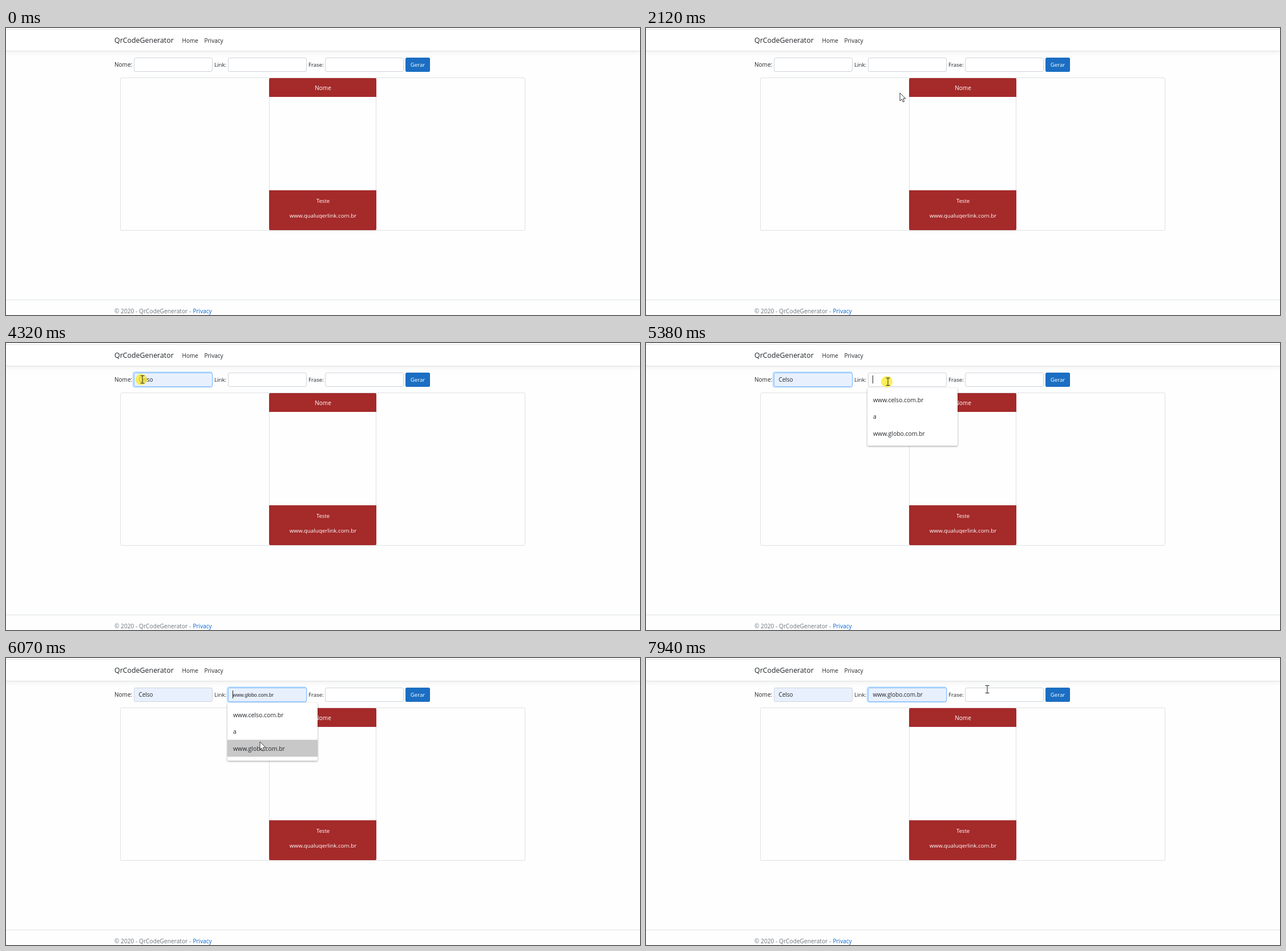
Animation of 1111 by 504 pixels, one loop 8000 ms. Source, as an HTML page:

```html
<!DOCTYPE html>
<html lang="pt-BR">
<head>
<meta charset="utf-8">
<title>QrCodeGenerator</title>
<style>
  html, body { margin: 0; width: 100%; height: 100%; overflow: hidden; background: #fefefe; }
  svg { display: block; width: 1111px; height: 504px; font: 10px "Open Sans", "Noto Sans", sans-serif; fill: #212529; }
  .line { fill: none; stroke: #dee0e2; }
  .box { fill: #fff; stroke: #ced4da; }
  .ring { fill: none; stroke: #bfdeff; stroke-width: 2.2; }
  .brown { fill: #a52a2a; }
  .white { fill: #fff; font-weight: 500; text-anchor: middle; }
  .menu text { font-size: 10.4px; }
  .preview { font: 8.75px "Liberation Sans", Arial, sans-serif; }
  .header { filter: drop-shadow(0 2.7px 4px rgba(0, 0, 0, .06)); }
  .panel { fill: #fff; filter: drop-shadow(0 1px 1.5px rgba(0, 0, 0, .4)); }
</style>
</head>
<body>
<svg viewBox="0 0 1111 504">
  <rect class="header" y="-20" width="1111" height="61" fill="#fff"/>
  <path class="line" d="M0 2.5H1111M0 40.5H1111M0 477.5H1111"/>
  <text x="190" y="26" font-size="12.4">QrCodeGenerator</text>
  <text x="308.5" y="26.3">Home</text>
  <text x="347.5" y="26.3">Privacy</text>

  <text x="190" y="67.5">Nome:</text>
  <text x="365" y="67.5" font-size="9.7">Link:</text>
  <text x="530" y="67.5" font-size="9.7">Frase:</text>
  <rect class="box" x="559.5" y="52.5" width="137" height="24" rx="2.5"/>
  <rect x="700" y="52" width="43" height="25" rx="2.5" fill="#1b6ec2"/>
  <text class="white" x="721.5" y="68" font-size="9.7">Gerar</text>

  <rect class="line" x="200.5" y="87.5" width="709" height="268" rx="2.5"/>
  <path class="line" d="M461.5 121V285M648.5 121V285"/>
  <path class="brown" d="M461 121V90q0-2 2-2H647q2 0 2 2V121ZM461 285H649V353q0 2-2 2H463q-2 0-2-2Z"/>
  <text class="white" x="555.5" y="109.3">Nome</text>
  <text class="white" x="555.5" y="306.5" font-size="9.5">Teste</text>
  <text class="white" x="555.5" y="332.8" font-size="9.8">www.qualuqerlink.com.br</text>

  <text x="190" y="501.3" font-size="10.2" fill="#6c757d">© 2020 - QrCodeGenerator -</text>
  <text x="327.5" y="501.3" fill="#0366d6">Privacy</text>

  <g id="fields"></g>
  <g id="menus"></g>
  <circle id="halo" r="10" fill="#fbe91c" opacity=".72"/>
  <path id="arrow" d="M0 0V14L3 11 5.500 16 7.500 15 5.500 10H10Z" fill="#fff" stroke="#222" stroke-width=".9"/>
  <path id="beam" d="M-3.500-6.500H3.500M0-6.500V6.500M-3.500 6.500H3.500" fill="none" stroke="#222"/>
</svg>
<script>
const LOOP = 8000, STEP = 77, START = 190, TRAVEL = 450;
const MENU_TOP = 84, ROW = 29.8;
const $ = id => document.getElementById(id);
const show = (el, on) => el.style.display = on ? "" : "none";

function add(parent, tag, attrs, text = "") {
  const el = document.createElementNS("http://www.w3.org/2000/svg", tag);
  for (const k in attrs) el.setAttribute(k, attrs[k]);
  el.textContent = text;
  return parent.appendChild(el);
}

// The menu is shown from `open` to `close`, which enters the item `pick`
const fields = [
  { x: 223, items: ["Celso", "a", "Teste"], open: 2760, close: 3300, pick: 0 },
  { x: 388, items: ["www.celso.com.br", "a", "www.globo.com.br"], open: 5360, close: 6850, pick: 2 }
];

for (const f of fields) {
  const x = f.x;
  f.ring = add($("fields"), "rect", { class: "ring", x: x - .2, y: 51, width: 138.6, height: 26.5, rx: 3.5 });
  f.box = add($("fields"), "rect", { class: "box", x: x + 1.5, y: 52.5, width: 137, height: 24, rx: 2.5 });
  f.text = add($("fields"), "text", { x: x + 9.4, y: 68 });
  f.caret = add($("fields"), "path", { d: `M${x + 9.5} 57V71`, stroke: "#222" });

  f.menu = add($("menus"), "g", { class: "menu" });
  add(f.menu, "rect", { class: "panel", x, y: 79, width: 158, height: 101.5, rx: 2 });
  f.bar = add(f.menu, "rect", { x, width: 158, height: ROW, fill: "#c8c8c8" });
  f.items.forEach((s, i) => add(f.menu, "text", { x: x + 10, y: MENU_TOP + 19.5 + i * ROW }, s));
}

// Pointer stops: arrival time, x, y
const stops = [
  [START, 984, 486], [800, 127, 190], [1050, 208, 304], [1650, 636, 100], [1810, 590, 282],
  [2115, 445, 114], [2640, 270, 63], [3040, 275, 91], [3800, 262, 64], [4260, 239, 64],
  [4760, 282, 66], [5270, 424, 68], [6030, 445, 147], [6200, 445, 160], [7520, 420, 88], [7880, 598, 55]
];
const clicks = [4320, ...fields.flatMap(f => [f.open, f.close])];

// Waits at each stop, then eases to the next one
function pointer(t) {
  const i = stops.findIndex(s => s[0] > t);
  if (i < 1) return stops.at(i).slice(1);
  const [a, x, y] = stops[i - 1], [b, u, v] = stops[i];
  const from = Math.max(a, b - TRAVEL);
  const k = Math.max(0, (t - from) / (b - from)), e = k * k * (3 - 2 * k);
  return [x + (u - x) * e, y + (v - y) * e];
}

function drawField(f, i, t, y) {
  const next = fields[i + 1], open = t >= f.open && t < f.close, picked = t >= f.close;
  const row = open && y >= MENU_TOP ? Math.min(2, Math.floor((y - MENU_TOP) / ROW)) : -1;
  const value = f.items[picked ? f.pick : row] || "";
  // The focus ring lags behind the menu of a later field
  const focused = t >= f.open + i * 70 && !(next && t >= next.open + 70);
  show(f.menu, open);
  show(f.caret, open);
  show(f.bar, row >= 0);
  show(f.ring, focused);
  f.bar.setAttribute("y", MENU_TOP + row * ROW);
  f.text.textContent = value;
  f.text.setAttribute("class", picked ? "" : "preview");
  f.box.style.fill = value ? "#e8f0fe" : "#fff";
  f.box.style.stroke = focused ? "#80bdff" : "#ced4da";
}

function draw(t) {
  const [x, y] = pointer(START + Math.floor((t - START) / STEP) * STEP);
  const visible = t >= START, typing = y > 52 && y < 77 && x > 223;

  fields.forEach((f, i) => drawField(f, i, t, y));
  for (const id of ["arrow", "beam", "halo"])
    $(id).setAttribute("transform", `translate(${id == "halo" ? x - 2 : x} ${y})`);
  show($("arrow"), visible && !typing);
  show($("beam"), visible && typing);
  show($("halo"), clicks.some(c => Math.abs(t - c) < 130));
}

const begin = performance.now();
function tick() {
  draw((performance.now() - begin) % LOOP);
  requestAnimationFrame(tick);
}
tick();
</script>
</body>
</html>
```
